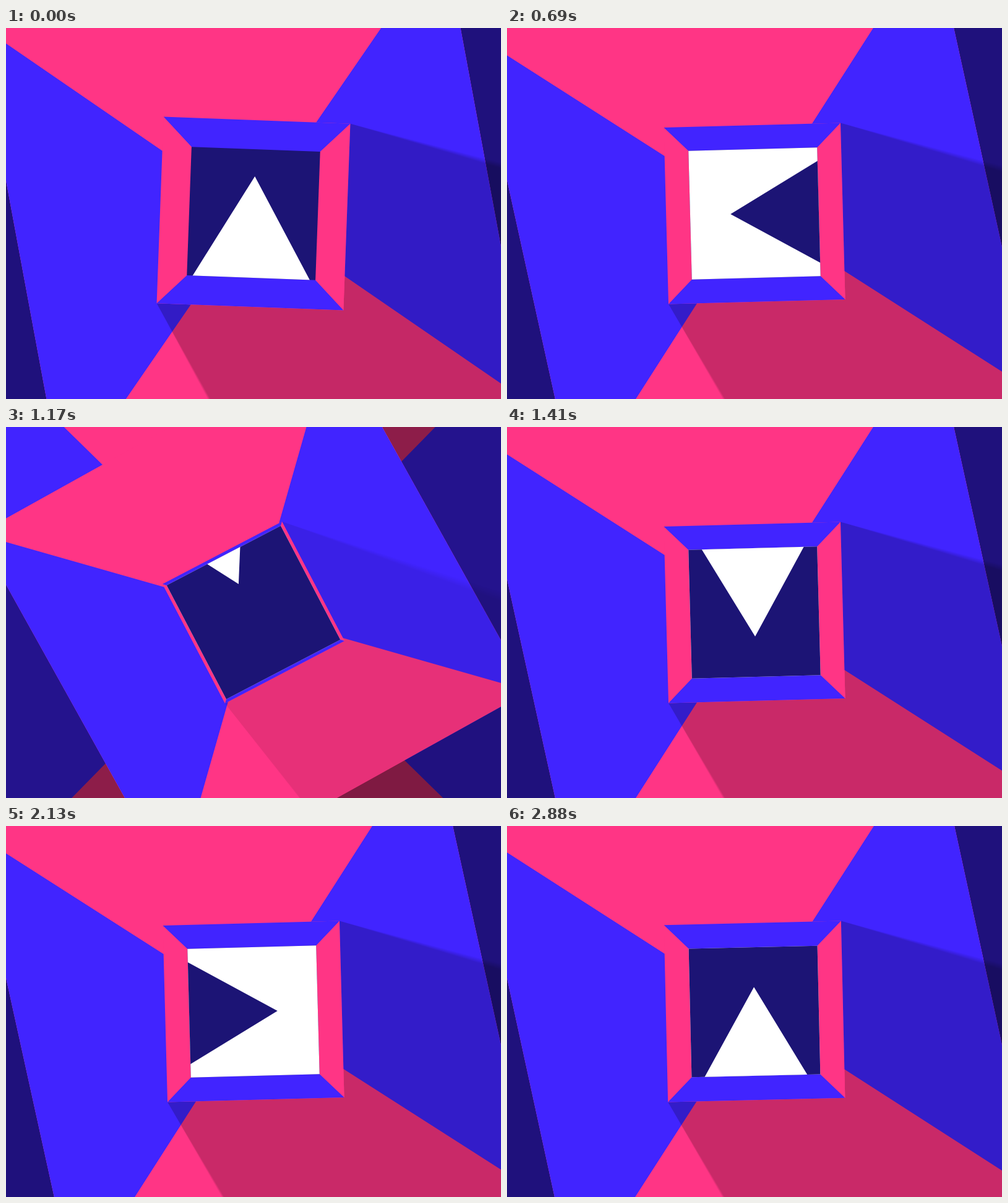
An HTML page with a canvas for the animation above (2.91 s loop, 800 by 600 pixels).

```html
<!DOCTYPE html>
<html>
<head>
<meta charset="utf-8">
<title>Rotating squares</title>
<style>
html, body { margin: 0; width: 100%; height: 100%; overflow: hidden; background: #000; }
canvas { display: block; }
</style>
</head>
<body>
<canvas id="stage" width="800" height="600"></canvas>
<script>
const W = 800, H = 600, CX = 400, CY = 300;
const PINK = '#ff3585', BLUE = '#4124ff', NAVY = '#1c1475', WHITE = '#fff';
const LOOP = 2910, TICK = 30, CYCLE = 24;
const HOLE = 104, BIRTH = 10, DEATH = 80, LIGHTS = 15;

// Keys are [age in ticks, value].
const SPIN = [[10, -47.3], [15, -27.6], [23.1, -1.2], [24, 2.1], [31, 30], [34, 42.7],
  [39, 60.9], [47, 77.6], [48, 79.5], [55, 85.9], [58, 87.3], [63, 89.4], [72, 90]];
const HALF = [[10, 104.3], [15, 109], [23.1, 143.3], [24, 151], [31, 230], [34, 271],
  [39, 327.6], [47, 379], [48, 383.6], [55, 405], [58, 410.7], [63, 414], [72, 416]];
const DEPTH = [[2, 0], [7, 12], [10, 24], [15, 52], [23.1, 144], [24, 164], [31, 344], [36, 480]];

const ctx = document.getElementById('stage').getContext('2d');
const shade = document.createElement('canvas');
shade.width = W;
shade.height = H;
const sctx = shade.getContext('2d');

// Smooth cubic curve through the keys, flat outside them.
function curve(keys, x) {
  const last = keys.length - 1;
  if (x <= keys[0][0]) return keys[0][1];
  if (x >= keys[last][0]) return keys[last][1];
  const i = keys.findIndex(k => k[0] > x) - 1;
  const slope = n => {
    const a = keys[Math.max(n - 1, 0)], b = keys[Math.min(n + 1, last)];
    return (b[1] - a[1]) / (b[0] - a[0]);
  };
  const [x0, y0] = keys[i], [x1, y1] = keys[i + 1];
  const w = x1 - x0, s = (x - x0) / w, r = 1 - s;
  return y0 * (1 + 2 * s) * r * r + y1 * s * s * (3 - 2 * s)
    + w * s * r * (slope(i) * r - slope(i + 1) * s);
}

function poly(c, points) {
  points.forEach(([x, y], i) => i ? c.lineTo(x, y) : c.moveTo(x, y));
  c.closePath();
}

function fill(color, ...shapes) {
  ctx.fillStyle = color;
  ctx.beginPath();
  shapes.forEach(s => poly(ctx, s));
  ctx.fill();
}

const box = h => [[-h, -h], [h, -h], [h, h], [-h, h]];

function turned(angle, draw) {
  ctx.save();
  ctx.translate(CX, CY);
  ctx.rotate(angle);
  draw();
  ctx.restore();
}

// Soft shadow thrown by a row of lights near the top left corner.
function castShadow(h, angle, alpha) {
  const c = Math.cos(angle), s = Math.sin(angle);
  const corners = box(h).map(([x, y]) => [CX + x * c - y * s, CY + x * s + y * c]);
  sctx.clearRect(0, 0, W, H);
  sctx.globalCompositeOperation = 'lighter';
  sctx.fillStyle = `rgba(0,0,0,${1 / LIGHTS})`;
  for (let i = 0; i < LIGHTS; i++) {
    const l = 14 - 2 * i;
    const far = ([x, y]) => [x + 40 * (x - l), y + 40 * (y - l)];
    sctx.beginPath();
    corners.forEach((p, n) => {
      const q = corners[(n + 1) % 4];
      const side = (q[0] - p[0]) * (l - p[1]) - (q[1] - p[1]) * (l - p[0]);
      if (side > 0) poly(sctx, [p, q, far(q), far(p)]);
    });
    sctx.fill();
  }
  ctx.globalAlpha = alpha;
  ctx.drawImage(shade, 0, 0);
  ctx.globalAlpha = 1;
}

function drawSquare(age) {
  const h = curve(HALF, age), angle = curve(SPIN, age) * Math.PI / 180;
  castShadow(h, angle, Math.min(0.51, Math.max(0, (age - 9) * 0.0148)));
  turned(angle, () => {
    fill(PINK, box(h));
    fill(BLUE, [[-h, -h], [h, -h], [0, 0]], [[h, h], [-h, h], [0, 0]]);
  });
}

// Triangles slide in from opposite sides of the turning window.
function drawHole(tick, newest) {
  const spin = curve(SPIN, tick - CYCLE * newest) + 90 * (newest + 1);
  turned(spin * Math.PI / 180, () => {
    ctx.beginPath();
    poly(ctx, box(HOLE));
    ctx.clip();
    const current = Math.floor(tick / CYCLE);
    for (let j = current - 2; j <= current; j++) {
      const odd = j % 2 !== 0, dir = odd ? 1 : -1;
      const depth = curve(DEPTH, tick - CYCLE * j);
      const apex = HOLE - depth, base = HOLE + 2, w = (base - apex) / Math.sqrt(3);
      if (depth > 0) fill(odd ? WHITE : NAVY, [[0, apex * dir], [w, base * dir], [-w, base * dir]]);
    }
  });
}

function render(ms) {
  let t = Math.floor((ms % LOOP) / TICK) * TICK;
  if (t > 2460) t = 2460 + (t - 2460) * 420 / 450; // the last stretch runs slightly slower
  const tick = t / TICK;
  ctx.fillStyle = '#000';
  ctx.fillRect(0, 0, W, H);
  const newest = Math.floor((tick - BIRTH) / CYCLE);
  for (let j = newest - 3; j <= newest; j++) {
    const age = tick - CYCLE * j;
    if (age < DEATH) drawSquare(age);
  }
  drawHole(tick, newest);
}

function loop() {
  render(performance.now());
  requestAnimationFrame(loop);
}
loop();
</script>
</body>
</html>
```
